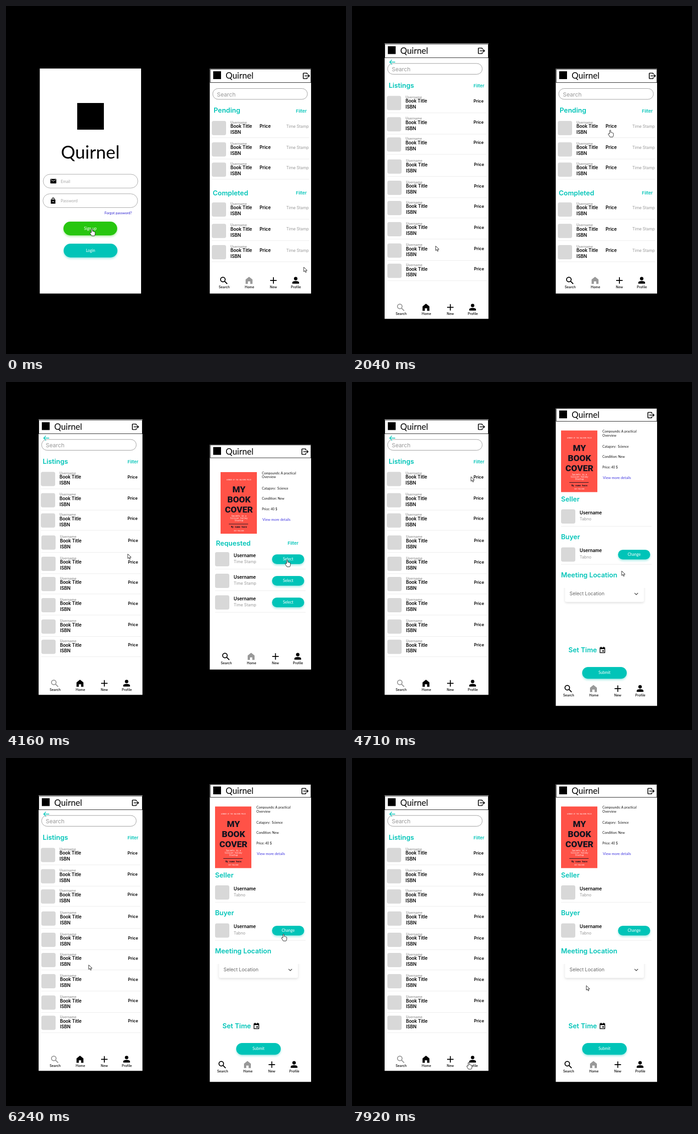
Write an HTML page with a canvas that moves like this. It is 740x757 px and loops after 8000 ms.

```html
<!DOCTYPE html>
<html lang="en">
<head>
<meta charset="utf-8">
<title>Book exchange walkthrough</title>
<style>
html, body { margin: 0; width: 100%; height: 100%; overflow: hidden; background: #000; }
canvas { display: block; }
</style>
</head>
<body>
<canvas id="stage" width="740" height="757"></canvas>
<script>
const c = document.getElementById('stage').getContext('2d');
const TEAL = '#00c4b8', GREY = '#999', BLUE = '#3325cf', INK = '#000';
const INTER = 'Inter, sans-serif', LATO = 'Lato, sans-serif', MONO = '"Noto Sans Mono", monospace';
const BRAND = 'Quirnel', PAY = 'Tabno';

// y is the optical centre of the capitals
function text(s, x, y, size, color = INK, weight = 400, family = INTER, align = 'left') {
  c.font = `${weight} ${size}px ${family}`;
  c.fillStyle = color;
  c.textAlign = align;
  c.fillText(s, x, y + size * .36);
}
const bold = (s, x, y, size = 9.75, color = INK) => text(s, x, y, size, color, 600);
const title = (s, x, y) => bold(s, x, y, 14.6, TEAL);
const thin = (s, x, y, size = 7.1, color = '#111', align) => text(s, x, y, size, color, 400, LATO, align);

function box(x, y, w, h, color) {
  c.fillStyle = color;
  c.fillRect(x, y, w, h);
}
function round(x, y, w, h, r, fill, stroke) {
  c.beginPath();
  c.roundRect(x, y, w, h, r);
  if (fill) { c.fillStyle = fill; c.fill(); }
  if (stroke) { c.strokeStyle = stroke; c.lineWidth = 1; c.stroke(); }
}
function path(d, x, y, { fill, stroke, width = 1 } = {}) {
  c.save();
  c.translate(x, y);
  const p = new Path2D(d);
  if (fill) { c.fillStyle = fill; c.fill(p, 'evenodd'); }
  if (stroke) { c.strokeStyle = stroke; c.lineWidth = width; c.lineJoin = 'round'; c.stroke(p); }
  c.restore();
}
const random = seed => () => (seed = seed * 16807 % 2147483647) / 2147483647;
const page = (x, y, w, h) => box(x, y, w, h, '#fff');
const rule = (x, y, w) => box(x, y, w, 1, '#ebebeb');
const thumb = (x, y) => round(x, y, 31, 31, 4, '#d8d8d8');
const backArrow = (x, y) => path('M13 0H1M6-5L1 0L6 5', x, y, { stroke: TEAL, width: 1.4 });

function button(x, y, w, h, lines, color = TEAL) {
  c.save();
  c.shadowColor = color + '60';
  c.shadowBlur = 4;
  c.shadowOffsetY = 2.5;
  round(x, y, w, h, h / 2, color);
  c.restore();
  lines = [].concat(lines);
  lines.forEach((s, i) => text(s, x + w / 2, y + h / 2 - .5 + (i - (lines.length - 1) / 2) * 10.5,
    8.5, '#fff', 400, LATO, 'center'));
}

function header(x, y, w, exitX, line) {
  box(x + 7, y + 5, 17, 17, INK);
  text(BRAND, x + 34, y + 14.5, 18.5, INK, 400, LATO);
  path('M9.5 4V2Q9.5 1 8.5 1H2Q1 1 1 2V12Q1 13 2 13H8.5Q9.5 13 9.5 12V10M4 7H14.5M11.5 4L14.5 7L11.5 10',
    exitX, y + 8, { stroke: INK, width: 1.7 });
  if (line) {
    c.strokeStyle = '#222';
    c.lineWidth = 1;
    c.strokeRect(x + .5, y + .5, w - 1, line);
  }
}

// x, y: centre of the first label; active: index of the grey icon
function nav(x, y, active) {
  const at = [0, 55, 107, 156], tone = i => i === active ? GREY : INK;
  ['Search', 'Home', 'New', 'Profile'].forEach((s, i) => text(s, x + at[i], y, 7.2, INK, 500, INTER, 'center'));
  path('M4-2A5 5 0 1 1-6-2A5 5 0 1 1 4-2M2.5 1.5L8.5 7.5', x - 2, y - 14, { stroke: tone(0), width: 2 });
  path('M-7.5-2L0-8L7.5-2V7.5H2.5V2H-2.5V7.5H-7.5Z', x + 54, y - 14, { fill: tone(1) });
  path('M-7 0H7M0-7V7', x + 107, y - 14, { stroke: INK, width: 1.9 });
  path('M3.8-4A3.8 3.8 0 1 1-3.8-4A3.8 3.8 0 1 1 3.8-4M-7.3 7V4.5C-7.3 .2 7.3 .2 7.3 4.5V7Z', x + 155.5, y - 14, { fill: INK });
}

function searchField(x, y) {
  round(x, y, 206, 23.5, 11.7, '#fff', '#999');
  text('Search', x + 9, y + 13, 12.3, '#999');
}

function bookRow(x, y) {
  thumb(x, y);
  text('Username', x + 40.5, y + 3, 7.2, GREY, 600);
  bold('Book Title', x + 40.5, y + 11.5);
  bold('ISBN', x + 40.5, y + 24.3);
}
function userRow(x, y, sub, w = 197) {
  thumb(x, y);
  bold('Username', x + 40.5, y + 7);
  text(sub, x + 40.5, y + 21, 8.7, GREY);
  rule(x, y + 36.5, w);
}

function cover(x, y) {
  const mid = x + 40, line = (s, dy, size, color = '#fff', weight = 400) =>
    text(s, mid, y + dy, size, color, weight, MONO, 'center');
  box(x, y, 79, 134, '#ff5247');
  line('WINNER OF THE HALVORN PRIZE', 16.5, 3.3);
  ['MY', 'BOOK', 'COVER'].forEach((s, i) => text(s, mid, y + 37.5 + i * 22, 19, '#14131f',
    '900 extra-condensed', 'Roboto, "Open Sans", sans-serif', 'center'));
  ['Secrets in a', 'Silicon Valley', 'Startup'].forEach((s, i) => line(s, 95.5 + i * 5, 4.5));
  box(x + 18, y + 112.5, 42, 1, '#14131f');
  line('My name here', 119.5, 4.8, '#14131f', 600);
  line('BEST PUBLISHER', 128, 2.6);
}
function bookInfo(x, y) {
  cover(x, y);
  ['Compounds: A practical', 'Overview', 'Catagory:  Science', 'Condition: New', 'Price: 40 $']
    .forEach((s, i) => thin(s, x + 90, y + [2, 10.5, 35, 57.3, 80][i]));
  thin('View more details', x + 91, y + 103, 7.8, '#3c32e0');
}

function login() {
  page(73.5, 136, 220.5, 489.5);
  box(155, 211, 58, 58, INK);
  text(BRAND, 183.5, 317.5, 39, INK, 400, LATO, 'center');
  round(81, 366, 206, 30, 15, '#fff', '#a5a5a5');
  round(80.5, 408.5, 206, 30, 15, '#fff', '#a5a5a5');
  path('M1 0H12Q13 0 13 1V9Q13 10 12 10H1Q0 10 0 9V1Q0 0 1 0Z', 96.5, 376, { fill: INK });
  path('M1 1.5L6.5 5L12 1.5', 96.5, 376, { stroke: '#fff' });
  path('M0 4H10V13H0Z M6.2 8.5A1.2 1.2 0 1 0 3.8 8.5A1.2 1.2 0 1 0 6.2 8.5', 97.5, 417, { fill: INK });
  path('M2.5 4V3A2.5 2.5 0 0 1 7.5 3V4', 97.5, 417, { stroke: INK, width: 1.3 });
  thin('Email', 119, 381.5, 8.8, '#aaa');
  thin('Password', 119, 424, 8.8, '#aaa');
  thin('Forgot password?', 274, 450.5, 7.7, '#2a1fd0', 'right');
  button(125, 469, 117, 30, 'Sign up', '#27c60f');
  button(125.5, 517, 117, 30, 'Login');
}

function listings() {
  page(71, 81.5, 226, 599);
  header(71, 82.5, 226, 274, 29.5);
  searchField(77.5, 125);
  backArrow(81, 122);
  title('Listings', 80, 172.5);
  bold('Filter', 264.5, 174, 9.6, TEAL);
  [195.4, 241.8, 285.7, 333.7, 380, 424, 470, 516.5, 560.6].forEach((y, i) => {
    const x = i < 3 ? 76 : 77;
    bookRow(x, y);
    bold('Price', x + 188.5, y + 11.5, 8.8);
    rule(x, y + 36.5, 216);
  });
  nav(107, 669.5, 0);
}

// A photographed book: soft tones on a dark table, speckled like its printed cover
function photo(x, w, stops, seed) {
  const g = c.createLinearGradient(x, 308, x + w * .6, 432), rnd = random(seed);
  stops.forEach((s, i) => g.addColorStop(i / (stops.length - 1), s));
  box(x, 308, w, 124, '#4a3b2b');
  box(x + 6, 311, w - 10, 117, g);
  for (let i = 0; i < 260; i++) {
    const px = x + 6 + rnd() * (w - 14), py = 311 + rnd() ** 1.4 * 113, r = 1 + rnd() * 3;
    round(px, py, r, r, r / 2, i % 3 ? '#2b292e80' : '#b5bcc080');
  }
}

function detail() {
  page(73.5, 16, 220.5, 729.5);
  header(74, 17, 220, 273);
  backArrow(83, 56.5);
  cover(78.5, 72);
  ['Compounds: A practical', 'Overview', 'Catagory:  Science', 'Condition: New', 'Price: $40.00']
    .forEach((s, i) => thin(s, 168, [74, 82.7, 103, 130, 154.5][i]));
  [['Orvelo', 168, '$132.95'], ['Dreff', 210, '$21.49'], ['Wimble', 248.5, '$151.20']].forEach(([shop, x, price]) => {
    thin(shop, x, 173, 7.2, BLUE);
    thin(price, x, 190.5, 6.8);
  });
  thin('Book Description', 79, 220.5, 5.6);
  c.strokeStyle = INK;
  c.lineWidth = 1;
  c.strokeRect(79.5, 231.5, 207.5, 58);
  ['Compounds: A Practical Overview presents chemistry visually',
    'through multi-level images macroscopic, molecular, and',
    'symbolic representations to help you see the connections',
    'between the world, the atoms and the molecules that compose',
    'the world.'].forEach((s, i) => thin(s, 86, 241 + i * 7.4, 5.8));
  thin('Front', 131, 298.7, 6, INK, 'center');
  thin('Back', 238, 298.7, 6, INK, 'center');
  photo(79, 107, ['#5c564d', '#68737a', '#7d8a8e', '#5c6268', '#5d4f44'], 11);
  const glow = c.createRadialGradient(134, 365, 2, 134, 365, 34);
  glow.addColorStop(0, '#b9cbc7');
  glow.addColorStop(1, '#8a9a9900');
  box(85, 311, 97, 117, glow);
  round(153, 308, 22, 22, 11, '#e9793c');
  photo(191, 96, ['#55565f', '#676671', '#5b5a65', '#494850'], 23);
  box(200, 318, 49, 32, '#7f94ab');
  box(242, 404, 36, 20, '#c6c2b8');
  button(135, 439.5, 97, 25.5, 'Request');
  text('Submit Question', 92, 477, 9, INK, 500);
  round(84.5, 485, 202, 38.5, 5, '#fff', '#aaa');
  text('Customer questions & answers', 83, 561, 12.6, INK, 500);
  const ask = '#2f66ee', qa = (s, x, y, color) => text(s, x, y, 8.9, color, 500);
  qa('question:', 83, 590);
  qa('How long have you had the book ?', 131.5, 590, ask);
  qa('answer:', 83, 603.5);
  qa('3 Years', 132, 603.5);
  qa('question:', 83, 630);
  qa('How many classes was this book', 131.5, 630, ask);
  qa('used for ?', 131.5, 642.7, ask);
  qa('answer:', 83, 655.5);
  qa('2 classes , CHEM 1, CHEM 2', 132, 655.5);
  nav(106.5, 716, 0);
}

function home() {
  page(443.5, 136.5, 220.5, 489);
  header(444, 137, 220, 646, 29);
  searchField(450, 179.5);
  [['Pending', 452, 227, 228.5, [250, 296.4, 340.4]],
    ['Completed', 450, 407, 407, [427.3, 473.7, 520]]].forEach(([name, x, y, filterY, rows]) => {
    title(name, x, y);
    bold('Filter', 631, filterY, 9.6, TEAL);
    rows.forEach(top => {
      bookRow(448, top);
      bold('Price', 552, top + 11.5);
      text('Time Stamp', 610, top + 11.5, 8.7, GREY);
      rule(448, top + 36, 212);
    });
  });
  nav(475, 611, 1);
}

function requested() {
  page(443.5, 136.5, 220.5, 489);
  header(444, 136.5, 220, 643, 28);
  bookInfo(467, 196);
  title('Requested', 457, 351);
  bold('Filter', 613, 350.5, 9.6, TEAL);
  for (let i = 0; i < 3; i++) {
    const y = 370 + i * 47;
    userRow(455, y, 'Time Stamp');
    button(579, y + 5, 70, 21, 'Select');
  }
  nav(479.5, 611, 1);
}

function meeting() {
  page(443.5, 57, 220.5, 647.5);
  header(444, 57, 220, 643, 28);
  bookInfo(455, 105.5);
  title('Seller', 455, 254.5);
  userRow(455, 277, PAY);
  title('Buyer', 455, 337);
  userRow(455, 359.7, PAY);
  button(579, 365, 70, 21, 'Change');
  title('Meeting Location', 455, 419.5);
  c.save();
  c.beginPath();
  c.rect(450, 448, 200, 50);
  c.clip();
  c.shadowColor = '#0002';
  c.shadowBlur = 5;
  c.shadowOffsetY = 2;
  round(463.5, 440, 172, 38.5, 4, '#fff');
  c.restore();
  text('Select Location', 473.5, 460.5, 10.4, '#666');
  path('M0 0L3.7 3.7L7.4 0', 615, 459, { stroke: '#444', width: 1.3 });
  title('Set Time', 471, 583);
  path('M0 2H12V14H0Z M1.5 5.5V12.5H10.5V5.5Z M6 8H9V11H6Z M2 .5H4V2H2Z M8 .5H10V2H8Z', 539, 575.5, { fill: INK });
  button(501, 620, 97, 25.5, 'Submit');
  nav(471.5, 681, 1);
}

function cityMap(x, y, w, h) {
  const rnd = random(7);
  c.save();
  c.beginPath();
  c.rect(x, y, w, h);
  c.clip();
  c.translate(x, y);
  box(0, 0, w, h, '#e8e5df');
  path('M131 8L146 3L158 15L143 28L132 22Z', 0, 0, { fill: '#ecd3d8' });
  for (let i = 0; i < 75; i++) {
    const px = rnd() * w, py = rnd() * h, len = 15 + rnd() * 45;
    const a = (i % 2 ? .35 : -1.15) + (rnd() - .5) * .5;
    path(`M0 0L${len * Math.cos(a)} ${len * Math.sin(a)}`, px, py, { stroke: '#fff', width: i % 9 ? .9 : 2 });
  }
  path('M0 36C30 54 62 74 92 82S140 103 165 105S205 107 222 103V118C190 123 150 122 125 113S90 98 72 92S25 72 0 60Z', 0, 0, { fill: '#74cbef' });
  path('M22 45L14 72M53 64L45 87M92 79L82 99M126 94L117 113', 0, 0, { stroke: '#fff', width: 1.5 });
  const label = (s, lx, ly, color = '#555', angle = 0) => {
    c.save();
    c.translate(lx, ly);
    c.rotate(angle);
    text(s, 0, 0, 4.8, color, 400, '"Open Sans", sans-serif', 'center');
    c.restore();
  };
  label('Basilica Santa', 45, 11);
  label('Maria Novella', 45, 17);
  label('Palazzo Bellini', 102, 4);
  label('Cortani', 102, 10);
  label('Santa Maria del Fiore', 111, 30);
  label('Museo Carlo Dorini', 50, 46);
  label('Palazzo Davanzati', 77, 69);
  label('Palazzo Vecchio', 111, 80);
  label('Ponte Vecchio', 79, 95);
  label('Basilica of the', 168, 91);
  label('Holy Cross', 168, 97);
  label('Fiume Arno', 162, 113, '#3c86b0');
  label('OLTRARNO', 54, 112, '#8a8f96');
  label('apel', 5, 91);
  label('NO', 5, 70, '#8a8f96');
  label('Via Serpentina', 175, 66, '#555', .15);
  label('Borgo Luna', 182, 9, '#555', -1.05);
  [[45, 3], [111, 23], [50, 39], [77, 62], [111, 74], [168, 84]].forEach(([px, py]) =>
    path('M0-2V2M-1.5-.7H1.5', px, py, { stroke: '#444', width: 1 }));
  c.restore();
}

function transaction() {
  page(443, 136, 221.5, 490);
  header(443, 136.5, 220, 642, 28);
  backArrow(454.5, 176);
  cityMap(443, 187, 221, 121.5);
  title('Book Title', 459.5, 332);
  title('Location', 567, 332);
  thumb(459, 347);
  text('ISBN', 498, 352.5, 8.9);
  text('Price', 498, 370, 8.9);
  rule(459, 381, 78);
  bold('Location', 567, 356, 9.6);
  title('Seller', 464, 394.5);
  title('Buyer', 566.5, 394.5);
  userRow(463, 409, PAY, 79);
  userRow(566, 409, PAY, 79);
  button(466, 475.5, 76, 25.5, ['Change', 'Location']);
  button(562, 475.5, 76, 25.5, ['Change', 'Time']);
  button(513, 512.5, 76, 25.5, ['Cancel', 'Transaction']);
  nav(476.5, 607.5, 1);
}

const HAND = 'M-1.2 8V1.2Q-1.2 0 0 0T1.2 1.2V5Q3 4.3 3.4 5.8Q5 5 5.4 6.4Q7 6 7 7.8V10.5Q7 13 5.5 15H-.5L-4 9.5Q-4.8 7.6-3 7.6Z';
const ARROW = 'M0 0V10L2.4 7.8L4 11.6L5.8 10.8L4.2 7.2H7.4Z';
function cursor([, x, y, hand]) {
  path(hand ? HAND : ARROW, x, y, { fill: '#fff', stroke: '#222' });
}

// [start ms, page]
const leftPages = [[0, login], [500, listings], [5140, detail], [6240, listings]];
const rightPages = [[0, home], [2620, requested], [4280, meeting], [6540, transaction], [7790, meeting]];

// [start ms, tip x, tip y, hand?]; pointers jump and hold
const leftCursor = [[0, 187, 485, 1], [500, 182, 522], [3880, 187, 525], [4010, 240, 450], [4160, 265, 374],
  [4280, 233, 300], [4430, 262, 205], [4580, 259, 186], [4710, 259, 206], [5420, 102, 325], [5570, 135, 410],
  [5700, 178, 455, 1], [5970, 180, 450, 1], [6240, 180, 450], [6390, 200, 483], [6540, 204, 490],
  [6820, 193, 505], [6950, 194, 545], [7100, 205, 595], [7220, 203, 614], [7520, 225, 640],
  [7640, 247, 660, 1], [7920, 254, 662, 1]];
const rightCursor = [[0, 648, 568], [500, 609, 515], [650, 580, 400], [770, 553, 282], [920, 551, 271, 1],
  [2040, 562, 270, 1], [2750, 562, 277], [3030, 562, 305], [3450, 588, 341], [3730, 604, 372],
  [3880, 608, 384, 1], [4160, 612, 387, 1], [4430, 608, 389], [4580, 598, 404], [4710, 587, 411],
  [5570, 596, 400], [5700, 602, 390], [5840, 605, 385, 1], [5970, 604, 383, 1], [6390, 605, 381],
  [6820, 602, 400], [6950, 598, 425], [7100, 580, 460], [7220, 553, 486], [7370, 539, 491],
  [7520, 518, 494, 1], [7640, 510, 494, 1], [7790, 510, 495]];
const current = (track, t) => track.findLast(k => k[0] <= t);

function draw(now) {
  const t = now % 8000;
  box(0, 0, 740, 757, '#000');
  current(leftPages, t)[1]();
  current(rightPages, t)[1]();
  cursor(current(leftCursor, t));
  cursor(current(rightCursor, t));
  requestAnimationFrame(draw);
}
requestAnimationFrame(draw);
</script>
</body>
</html>
```
